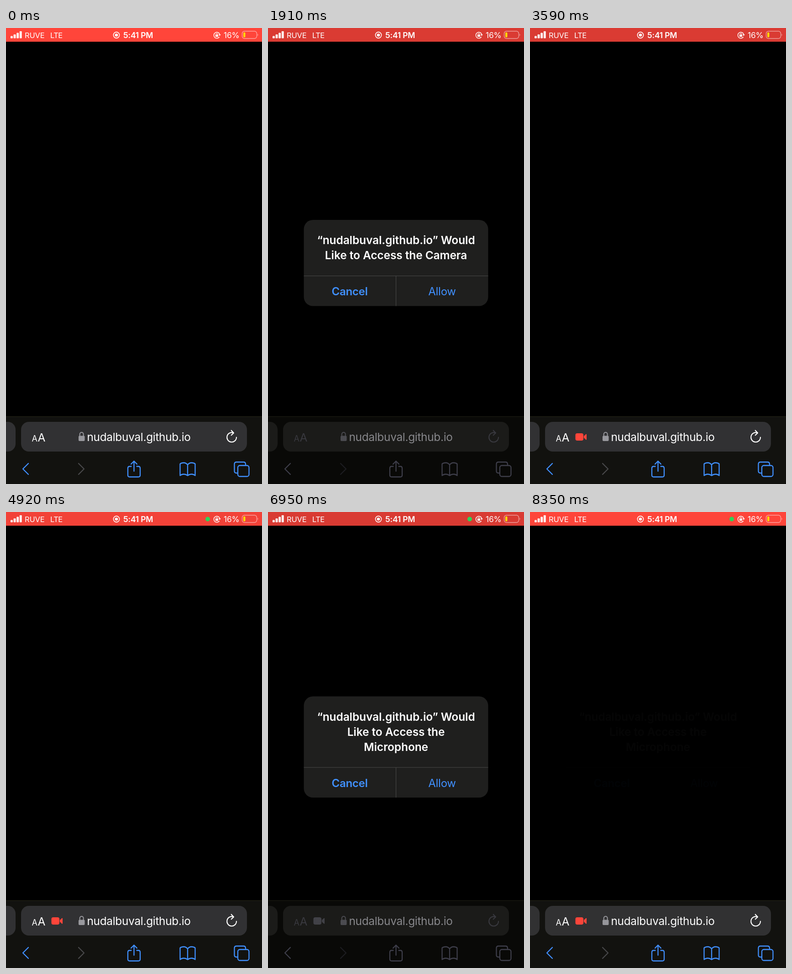
Write an HTML page that moves like this. It is 561 px wide and 998 px high and loops after 8370 ms.

```html
<!DOCTYPE html>
<html lang="en">
<head>
<meta charset="utf-8">
<title>Camera and microphone permission</title>
<style>
  html, body { margin: 0; width: 100%; height: 100%; overflow: hidden; background: #000; }
  svg { display: block; width: 561px; height: 998px; font-family: Inter, Roboto, sans-serif; }
  text { white-space: pre; }
  .line { fill: none; stroke-width: 2.3; stroke-linecap: round; stroke-linejoin: round; }
  .icon { stroke: var(--icon); }
  .link { stroke: var(--link); }
  .off { stroke: var(--off); }
  .pill { fill: var(--pill); }
  .status text { font-size: 17.5px; letter-spacing: -.2px; fill: #fff; }
  .alert text { font-size: 24.4px; letter-spacing: -.05px; text-anchor: middle; fill: #fff; }
  .alert .bold { font-weight: 600; }
  .alert .button { font-size: 24px; letter-spacing: -.3px; fill: #4090ff; }
</style>
</head>
<body>
<svg viewBox="0 0 561 998">
  <rect width="561" height="998"/>

  <g class="status">
    <rect id="bar" width="561" height="30"/>
    <g id="signal" fill="#fff"></g>
    <text x="41" y="21.7" style="font-size:16.5px">RUVE</text>
    <text x="97" y="21.7" style="font-size:16.5px;letter-spacing:-.6px">LTE</text>
    <circle cx="242" cy="15.5" r="6.6" fill="none" stroke="#fff" stroke-width="1.6"/>
    <circle cx="242" cy="15.5" r="3.3" fill="#fff"/>
    <text x="257" y="21.7" font-weight="600">5:41 PM</text>
    <circle id="dot" cx="442" cy="15.5" r="5" fill="#30d158"/>
    <g fill="none" stroke="#fff" stroke-width="1.5">
      <path d="M467.6 19.5A6.6 6.6 0 1 1 468.4 14"/>
      <path d="M460.3 15v-1.5a1.7 1.7 0 0 1 3.4 0V15" stroke-width="1.1"/>
    </g>
    <path d="M459 14.8h6v4.4h-6zM465.7 14h5l-2.5 3.4z" fill="#fff"/>
    <text x="477" y="21.7">16%</text>
    <rect x="517.5" y="7" width="32" height="16" rx="5" fill="none" stroke="#fff" stroke-opacity=".5" stroke-width="1.4"/>
    <path d="M551.3 12.5q2.6 2.5 0 5z" fill="#fff" fill-opacity=".5"/>
    <rect x="520" y="9.5" width="4.5" height="11" rx="2" fill="#ffd60a"/>
  </g>

  <g>
    <rect y="850" width="561" height="148" fill="var(--bar)"/>
    <rect y="850" width="561" height="1" fill="var(--edge)"/>
    <rect class="pill" x="-30" y="862" width="51" height="65" rx="17"/>
    <rect class="pill" x="33" y="862" width="495" height="65" rx="17"/>
    <g fill="var(--icon)">
      <text x="56.5" y="905" font-size="18">A</text>
      <text x="69.5" y="905" font-size="24.5">A</text>
    </g>
    <g id="video" fill="var(--video)">
      <rect x="99.5" y="887" width="17.5" height="16" rx="4"/>
      <path d="M118 893l4.5-4q1.5-1 1.5 1v10q0 2-1.5 1l-4.5-4z"/>
    </g>
    <rect x="159" y="892.5" width="13.5" height="11.5" rx="2" fill="var(--lock)"/>
    <path d="M161.7 893v-4a4 4 0 0 1 8 0v4" fill="none" stroke="var(--lock)" stroke-width="2"/>
    <text x="177.5" y="903.8" font-size="24.4" letter-spacing="-.3" fill="var(--url)">nudalbuval.github.io</text>
    <path class="line icon" style="stroke-width:2.1" d="M505 895.8A10.4 10.4 0 1 1 498.5 886.2M493.7 880.7L499 886.2L493.7 891.2"/>

    <path class="line link" d="M49 953L37 965L49 977"/>
    <path class="line off" d="M159 953L171 965L159 977"/>
    <path class="line link" d="M274.5 959.5H271q-4 0-4 4v15q0 4 4 4h19q4 0 4-4v-15q0-4-4-4h-3.5M280.5 970V948M274 954.5L280.5 948L287 954.5"/>
    <path class="line link" d="M398 956q-3.500-4.500-8.500-4.500t-8 2.500v25.500q3.500-3 8-3t8.500 3q4-3 8.500-3t8 3V954q-3-2.500-8-2.500t-8.500 4.500v23.500"/>
    <g class="line link">
      <rect x="508" y="957.5" width="24.5" height="24" rx="4.5"/>
      <path d="M507 974h-2q-4.500 0-4.500-4.500v-15q0-4.500 4.500-4.500h15.500q4.500 0 4.500 4.500v2"/>
    </g>
  </g>

  <g id="camera" class="alert"></g>
  <g id="microphone" class="alert"></g>
</svg>
<script>
const LOOP = 8370, PULSE = LOOP / 10, MIDDLE = 514.3;
const byId = id => document.getElementById(id);
const root = document.documentElement;
const clamp = x => Math.max(0, Math.min(1, x));
const mix = (a, b, k) => `rgb(${a.map((v, i) => v + (b[i] - v) * k)})`;

// Toolbar colours: normal, then behind an alert
const palette = {
  bar: [[18, 18, 15], [9, 9, 7]],
  edge: [[40, 40, 26], [32, 32, 22]],
  pill: [[49, 49, 51], [27, 27, 25]],
  icon: [[255, 255, 255], [57, 57, 63]],
  url: [[255, 255, 255], [135, 135, 139]],
  lock: [[152, 152, 157], [75, 75, 80]],
  link: [[64, 144, 255], [62, 62, 74]],
  off: [[72, 72, 74], [29, 29, 33]],
  video: [[255, 69, 58], [65, 65, 71]]
};

const alerts = [
  { id: 'camera', open: 560, close: 2700,
    lines: ['“nudalbuval.github.io” Would', 'Like to Access the Camera'] },
  { id: 'microphone', open: 6300, close: 7950,
    lines: ['“nudalbuval.github.io” Would', 'Like to Access the', 'Microphone'] }
];

byId('signal').innerHTML = [5, 8.5, 12, 15.5].map((h, i) =>
  `<rect x="${10 + i * 6.6}" y="${22.5 - h}" width="4.8" height="${h}" rx="1.2"/>`).join('');

for (const { id, lines } of alerts) {
  const height = 122.5 + 33 * lines.length;
  const top = MIDDLE - height / 2, split = top + height - 66;
  byId(id).innerHTML = `
    <rect x="78.5" y="${top}" width="404" height="${height}" rx="20" fill="#1f1f1e"/>
    <path d="M78.5 ${split}h404M280.5 ${split}v66" stroke="#4a4a48"/>` +
    lines.map((s, i) => `<text class="bold" x="280.5" y="${top + 53 + 33 * i}">${s}</text>`).join('') + `
    <text class="button bold" x="179" y="${split + 42.5}">Cancel</text>
    <text class="button" x="381.5" y="${split + 42.5}">Allow</text>`;
}

// The screen freezes twice while the camera starts
function heldTime(t) {
  if (t >= 3220 && t < 3510) return 3220;
  if (t >= 3590 && t < 4140) return 3590;
  return t;
}

function draw(t) {
  const bright = Math.abs(Math.cos(Math.PI * t / PULSE)) ** 5;
  byId('bar').style.fill = mix([214, 58, 50], [255, 69, 58], bright);
  byId('dot').style.display = t >= 4140 ? '' : 'none';
  byId('video').style.display = t >= 3510 ? '' : 'none';

  let dim = 0;
  for (const { id, open, close } of alerts) {
    const shown = 1 - (1 - clamp((t - open) / 400)) ** 3;
    const alpha = shown * (1 - clamp((t - close) / 470)) ** 2;
    const scale = 1.2 - 0.2 * shown;
    const node = byId(id);
    node.setAttribute('opacity', alpha);
    node.setAttribute('transform',
      `translate(280.5 ${MIDDLE}) scale(${scale}) translate(-280.5 ${-MIDDLE})`);
    dim = Math.max(dim, alpha);
  }
  for (const name in palette) root.style.setProperty('--' + name, mix(...palette[name], dim));
}

const start = performance.now();
function tick() {
  draw(heldTime((performance.now() - start) % LOOP));
  requestAnimationFrame(tick);
}
tick();
</script>
</body>
</html>
```
